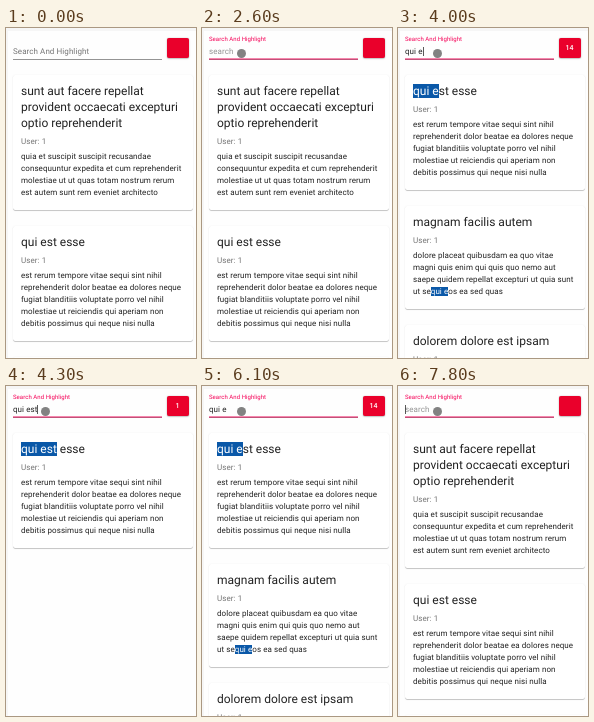
An HTML page for the animation above (8 s loop, 190 px wide and 330 px high).

```html
<!DOCTYPE html>
<html lang="en">
<head>
<meta charset="utf-8">
<title>Search and highlight</title>
<style>
  html, body { margin: 0; width: 100%; height: 100%; overflow: hidden; }
  body { background: #f6f6f6; font: 8px/12px Roboto, sans-serif; letter-spacing: .00938em; color: rgba(0,0,0,.87); text-rendering: geometricPrecision; }
  #stage { position: relative; width: 190px; height: 330px; overflow: hidden; }
  #stage > * { position: absolute; }
  #page { left: 2px; top: 3px; right: 0; bottom: 0; background: #fefefe; }
  #label, #value, #hint { left: 7px; top: 17.5px; white-space: pre; }
  #label { transform-origin: 0 50%; }
  #hint { color: rgba(0,0,0,.42); }
  #rule, #focus { left: 7px; width: 149px; }
  #rule { top: 30.5px; height: .5px; background: rgba(0,0,0,.42); }
  #focus { top: 30px; height: 1px; background: #f0105f; }
  #caret { top: 18.5px; width: .6px; height: 9.5px; background: rgba(0,0,0,.65); }
  #badge {
    left: 160.5px; top: 9.5px; width: 22px; height: 20px; border-radius: 2px; background: #ea002b;
    color: #fff; font: 500 7px/20px Roboto, sans-serif; text-align: center;
    box-shadow: 0 0 1px rgba(0,0,0,.3), 0 1px 1px rgba(0,0,0,.14), 0 .5px 2.5px rgba(0,0,0,.12);
  }
  #cards { left: 7px; top: 47px; width: 179.5px; }
  .card {
    box-sizing: border-box; margin-bottom: 15.8px; padding: 8px 8px 11.3px; background: #fff; border-radius: 2px; white-space: nowrap;
    box-shadow: 0 1px .5px -.5px rgba(0,0,0,.2), 0 .5px .5px rgba(0,0,0,.14), 0 .5px 1.5px rgba(0,0,0,.12);
  }
  .title { font-size: 12px; line-height: 16px; letter-spacing: 0; margin-bottom: 4.9px; }
  .user { color: rgba(0,0,0,.54); margin-bottom: 3px; }
  mark { background: #0a58a8; color: #fff; }
  #mouse { left: 0; top: 0; overflow: visible; }
  #dot { left: 35px; top: 20.5px; width: 9px; height: 9px; border-radius: 50%; background: #828282; }
</style>
</head>
<body>
<div id="stage">
  <div id="page"></div>
  <div id="cards"></div>
  <div id="label">Search And Highlight</div>
  <div id="hint">search</div>
  <div id="value"></div>
  <div id="rule"></div>
  <div id="focus"></div>
  <div id="caret"></div>
  <div id="badge"></div>
  <svg id="mouse" width="1" height="1">
    <path id="arrow" d="M0 0V10L2.4 7.8L4 11.3L5.6 10.6L4 7.2H7.2Z" fill="#111" stroke="#fff" stroke-width=".6"/>
    <path id="beam" d="M0-4V4M-3.5 0H3.5M-1.5-4H1.5M-1.5 2.5L0 4L1.5 2.5" fill="none" stroke="#111" stroke-width="1.2"/>
  </svg>
  <div id="dot"></div>
</div>
<script>
const LOOP = 8000, TICK = 100;

const posts = [
  ["sunt aut facere repellat\nprovident occaecati excepturi\noptio reprehenderit",
   "quia et suscipit suscipit recusandae\nconsequuntur expedita et cum reprehenderit\nmolestiae ut ut quas totam nostrum rerum\nest autem sunt rem eveniet architecto"],
  ["qui est esse",
   "est rerum tempore vitae sequi sint nihil\nreprehenderit dolor beatae ea dolores neque\nfugiat blanditiis voluptate porro vel nihil\nmolestiae ut reiciendis qui aperiam non\ndebitis possimus qui neque nisi nulla"],
  ["magnam facilis autem",
   "dolore placeat quibusdam ea quo vitae\nmagni quis enim qui quis quo nemo aut\nsaepe quidem repellat excepturi ut quia sunt\nut sequi eos ea sed quas"],
  ["dolorem dolore est ipsam", "dignissimos aperiam dolorem qui eum\nfacilis quibusdam animi sint suscipit"]
];

// time, query, result count, caret shown
const steps = [
  [0, "", "", 0], [1300, "", "", 1], [1600, "", "", 0], [2200, "", "", 1], [2600, "", "", 0],
  [3300, "q", "97", 1], [3400, "qu", "88", 1], [3500, "qui", "76", 1], [3800, "qui", "76", 0],
  [4000, "qui e", "14", 1], [4200, "qui es", "1", 1], [4300, "qui est", "1", 1],
  [4800, "qui est", "1", 0], [5300, "qui est", "1", 1],
  [5600, "qui es", "1", 1], [5700, "qui e", "14", 1], [6100, "qui e", "14", 0],
  [7200, "", "", 0], [7700, "", "", 1]
];

const el = Object.fromEntries([...document.querySelectorAll("[id]")].map(e => [e.id, e]));
const clamp = x => Math.min(1, Math.max(0, x));
const easeOut = x => 1 - (1 - clamp(x)) ** 3;
const show = (e, on) => { e.style.visibility = on ? "visible" : "hidden"; };

function highlight(text, query) {
  const html = query ? text.split(query).join(`<mark>${query}</mark>`) : text;
  return html.replace(/\n/g, "<br>");
}

let shownQuery = null;
function drawCards(query) {
  if (query === shownQuery) return;
  shownQuery = query;
  el.cards.innerHTML = posts
    .filter(post => post.some(text => text.includes(query)))
    .map(([title, body]) => `<div class="card"><div class="title">${highlight(title, query)}</div>
      <div class="user">User: 1</div><div>${highlight(body, query)}</div></div>`)
    .join("");
}

function drawField(t, query, caretOn) {
  const p = easeOut((t - 1150) / 250);
  el.label.style.transform = `translateY(${-12.5 * p}px) scale(${1 - .25 * p})`;
  el.label.style.color = t < 1200 ? "rgba(0,0,0,.54)" : "#f50057";
  el.focus.style.transform = `translateY(.5px) scaleX(${p})`;
  el.hint.style.opacity = query ? 0 : clamp((t - 1200) / 300);
  el.value.textContent = query;
  el.caret.style.left = 7 + el.value.getBoundingClientRect().width + "px";
  show(el.caret, caretOn);
}

function drawPointer(t) {
  const p = clamp((t - 350) / 550);
  const x = 1 + 38 * p, y = 58 - 33 * easeOut(p);
  const overField = y < 32;
  el.mouse.style.transform = `translate(${x}px, ${y}px)`;
  show(el.arrow, t >= 400 && t < 1200 && !overField);
  show(el.beam, t >= 400 && t < 1200 && overField);
  show(el.dot, t >= 1200);
}

function draw(now) {
  const t = Math.floor((now % LOOP) / TICK) * TICK;
  const [, query, count, caretOn] = steps.filter(s => s[0] <= t).pop();
  drawCards(query);
  drawField(t, query, caretOn);
  drawPointer(t);
  el.badge.textContent = count;
}

const start = performance.now();
function frame() {
  draw(performance.now() - start);
  requestAnimationFrame(frame);
}
frame();
</script>
</body>
</html>
```
